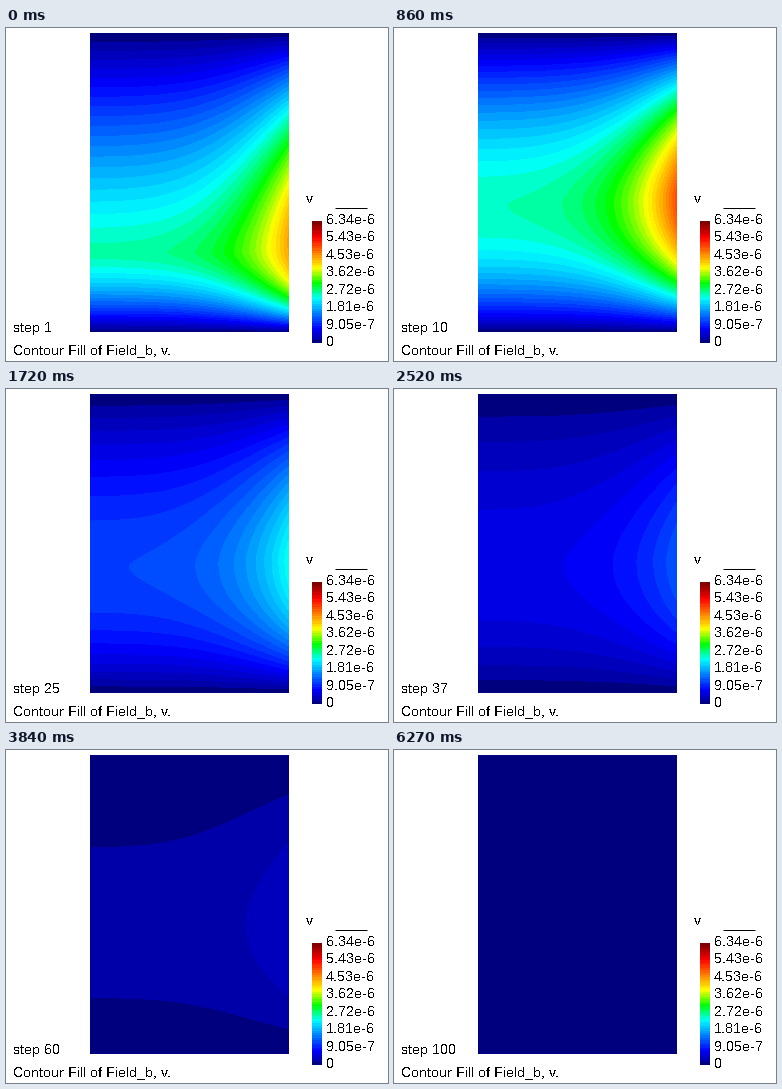
Recreate the animation shown at these times as a matplotlib script. Size 382 px wide and 333 px high, loop 6.47 s.

```python
import numpy as np
import matplotlib.pyplot as plt
from matplotlib.animation import FuncAnimation

W, H, DPI = 382, 333, 64
LOOP, TICK = 6470, 10
LEFT, RIGHT, TOP, BOTTOM = 84, 283, 5, 304
BANDS = 50
MAX_VALUE = 6.338e-6
DECAY = 0.0535
PEAK_STEP = 6

# Crisp bitmap-like lettering with whole-pixel advances.
plt.rcParams.update({"font.family": "Liberation Sans", "text.antialiased": False,
                     "text.hinting": "native", "text.hinting_factor": 1})

rows = np.arange(TOP, BOTTOM) + 0.5
u = (np.arange(LEFT, RIGHT) + 0.5 - LEFT) / (RIGHT - LEFT)
side_blend = 0.15 * u ** 2 + 0.85 * u ** 4


def hump(peak, centre, upper, lower):
    """Vertical profile: zero at both ends, with its own power on each side."""
    above = rows < centre
    reach = np.where(above, (rows - TOP) / (centre - TOP),
                     (BOTTOM - rows) / (BOTTOM - centre))
    return peak * (1 - (1 - reach) ** np.where(above, upper, lower))


def spread(left, right):
    """Fill the plate between its edge profiles, measured in colour bands."""
    return left[:, None] + (right - left)[:, None] * side_blend


FIRST = spread(hump(20.4, 224, 1.22, 1.6), hump(35.5, 212, 1.55, 2.5))
MODE_LEFT = hump(4.7, 177, 1.7, 2.25)
MODE_RIGHT = hump(10, 170, 1.55, 2.05)


def decaying(step):
    damping = 1 - 0.06 * np.exp((10 - step) / 8)
    return np.exp(DECAY * (37 - step)) * spread(MODE_LEFT, MODE_RIGHT * damping)


def field(step):
    if step >= PEAK_STEP:
        return decaying(step)
    w = (step - 1) / (PEAK_STEP - 1)
    return (1 - w) * FIRST + w * decaying(PEAK_STEP)


def rainbow():
    """Dark blue, blue, cyan, green, yellow, red, dark red."""
    level = (np.arange(BANDS) + 1) / BANDS
    level[0] = 0
    red = np.minimum((level - 0.5) * 8, 1.5 - (level - 0.875) * 4 - 0.5)
    green = np.minimum((level - 0.125) * 4, (0.875 - level) * 4)
    blue = np.minimum(0.5 + level * 4, (0.5 - level) * 8)
    return (np.clip(np.stack([red, green, blue], axis=1), 0, 1) * 255).astype(np.uint8)


PALETTE = rainbow()


def paint(values):
    return PALETTE[np.clip(values, 0, BANDS - 1).astype(int)]


def step_at(ms):
    """Pictures change every 66 ms after the first hold; a few steps are skipped."""
    shown = np.clip((ms - 320) // 66 + 1, 0, 91)
    return int(round(np.interp(shown, [0, 9, 22, 34, 45, 64, 91],
                               [1, 10, 25, 37, 51, 71, 100])))


fig = plt.figure(figsize=(W / DPI, H / DPI), dpi=DPI, facecolor="white")
ax = fig.add_axes([0, 0, 1, 1])


def label(x, baseline, text):
    return ax.text(x, baseline, text, fontsize=14 * 72 / DPI, color="black",
                   ha="left", va="baseline")


def picture(pixels, x0, x1, y0, y1):
    return ax.imshow(pixels, extent=(x0, x1, y1, y0), interpolation="nearest",
                     aspect="auto")


plate = picture(paint(FIRST), LEFT, RIGHT, TOP, BOTTOM)
bar = np.linspace(BANDS, 0, 122)[:, None]
picture(paint(np.repeat(bar, 10, axis=1)), 306, 316, 193, 315)

label(300, 175, "v")
ax.plot([329, 361], [179.5, 179.5], color="black", lw=72 / DPI, solid_capstyle="butt")
for i in range(8):
    value = MAX_VALUE * (7 - i) / 7
    text = f"{value:.2e}".replace("e-0", "e-") if value else "0"
    label(320, 196 + 17.43 * i, text)

counter = label(7, 304, "step 1")
label(7, 326, "Contour Fill of Field_b, v.")

ax.set_xlim(0, W)
ax.set_ylim(H, 0)
ax.axis("off")


def update(frame):
    step = step_at(frame * TICK)
    text = f"step {step}"
    if counter.get_text() != text:
        counter.set_text(text)
        plate.set_data(paint(field(step)))
    return plate, counter


anim = FuncAnimation(fig, update, frames=LOOP // TICK, interval=TICK,
                     repeat=True, repeat_delay=0, blit=False)
plt.show()
```
